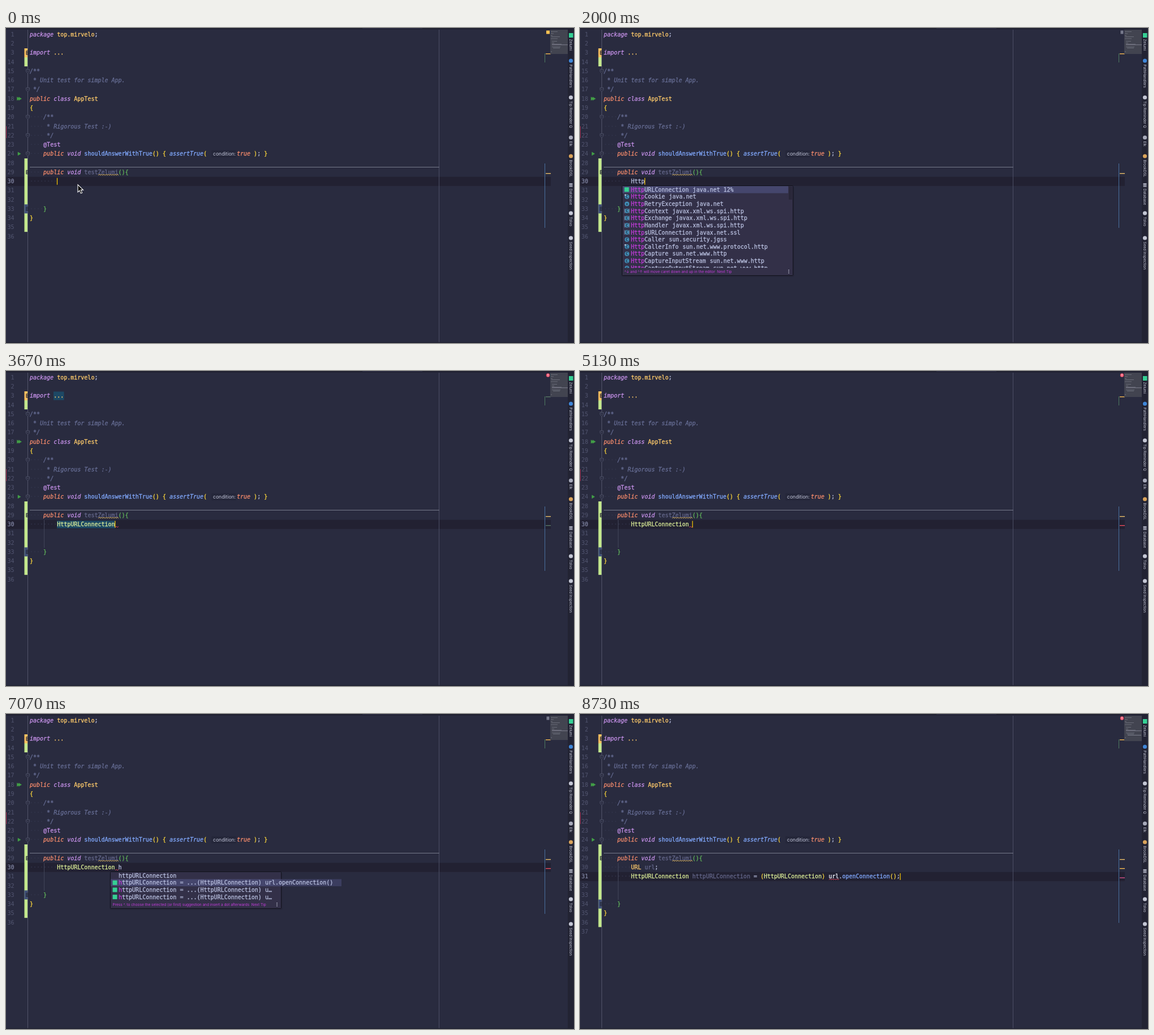
Recreate the animation shown at these times as an HTML page. Size 1004 px wide and 558 px high, loop 8.76 s.

```html
<!DOCTYPE html>
<html lang="en">
<head>
<meta charset="utf-8">
<title>Editor completion</title>
<style>
html, body { margin: 0; width: 100%; height: 100%; overflow: hidden; background: #292b3f; }
svg { display: block; width: 1004px; height: 558px; }
text { white-space: pre; font: 10px "DejaVu Sans Mono", monospace; }
text, tspan { fill: currentColor; stroke: currentColor; stroke-width: .28px; }
text.ui { font-family: Inter, "Noto Sans", sans-serif; stroke-width: 0; }
.p { color: #c792ea; font-style: italic; }
.o { color: #f78c6c; font-style: italic; }
.i { color: #82aaff; font-style: italic; }
.c { color: #676e95; font-style: italic; }
.a { color: #c792ea; }
.y { color: #ffcb6b; }
.b { color: #ffd83b; }
.g { color: #62b85b; }
.l { color: #dcee98; }
.m { color: #82aaff; }
.w { color: #b9c0e0; }
.u { color: #f3f4ff; }
.d { color: #64678a; }
.s { color: #363850; stroke-width: 0; }
.h { color: #c43cdb; }
</style>
</head>
<body>
<svg id="stage" viewBox="0 0 1004 558" xml:space="preserve"></svg>
<script>
const LOOP = 8760, STEP = 16.27, CHAR = 6.02;
const PANEL = '#333048', SELECTED = '#45466d';
const TYPING = [[0, ''], [1000, 'H'], [1300, 'Ht'], [1450, 'Htt'], [1600, 'Http'],
  [2600, 'HttpURLConnection'], [4100, 'HttpURLConnection '], [6130, 'HttpURLConnection h'], [7930, ''], [8430, '']];
const HEAD = [
  '~ppackage ~ytop.mirvelo~w;', '', '~pimport ~y...', '',
  '~c/**', '~c * Unit test for simple App.', '~c */',
  '~opublic ~pclass ~yAppTest', '~b{',
  '    ~c/**', '    ~c * Rigorous Test :-)', '    ~c */', '    ~a@Test',
  '    ~opublic ~pvoid ~mshouldAnswerWithTrue~b() { ~iassertTrue~b(', '',
  '    ~opublic ~pvoid ~dtestZelumi~g(){'];
const FINAL = ['        ~yURL ~durl~w;',
  '        ~lHttpURLConnection ~dhttpURLConnection ~w= ~b(~lHttpURLConnection~b) ~uurl~w.~mopenConnection~b()~w;'];
const CLASSES = ['URLConnection java.net 12%', 'Cookie java.net', 'RetryException java.net',
  'Context javax.xml.ws.spi.http', 'Exchange javax.xml.ws.spi.http', 'Handler javax.xml.ws.spi.http',
  'sURLConnection javax.net.ssl', 'Caller sun.security.jgss', 'CallerInfo sun.net.www.protocol.http',
  'Capture sun.net.www.http', 'CaptureInputStream sun.net.www.http', 'CaptureOutputStream sun.net.www.http'];
const CAST = 'ttpURLConnection = ...(HttpURLConnection) u';
const VARS = ['ttpURLConnection', CAST + 'rl.openConnection()', CAST + '…', CAST + '…'];
const TOOLS = [[13, 'Zelumi', '#35d094'], [58, 'PathHandlers', '#3f86d8'], [123, 'Tip Reminder Q', '#c3c6d4'],
  [194, 'Elk', '#a7aabb'], [227, 'BrookDSL', '#d9a35b'], [278, 'Database', ''],
  [328, 'Tolvo', '#c3c6d4'], [372, 'Seed Inspection', '#c3c6d4']];

const rowY = i => 11.3 + STEP * i;
const itemY = i => 286.2 + i * 12.64;
const rect = (x, y, w, h, fill, more = '') => `<rect x="${x}" y="${y}" width="${w}" height="${h}" fill="${fill}" ${more}/>`;
const path = (d, stroke, width = 1, fill = 'none') => `<path d="${d}" stroke="${stroke}" stroke-width="${width}" fill="${fill}"/>`;
const dot = (x, y, r, fill) => `<circle cx="${x}" cy="${y}" r="${r}" fill="${fill}"/>`;
const text = (x, y, cls, s, more = '') => `<text x="${x}" y="${y + 3.5}" class="${cls}" ${more}>${s}</text>`;
const ui = (x, y, size, color, s) =>
  `<text class="ui" x="${x}" y="${y + size * .36}" style="font-size:${size}px;color:${color}">${s}</text>`;

// Leading spaces become whitespace dots; "~x" starts a span of class x.
function code(x, y, line) {
  const [indent, ...spans] = line.split('~');
  return text(x, y, 's', '·'.repeat(indent.length) +
    spans.map(s => `<tspan class="${s[0]}">${s.slice(1)}</tspan>`).join(''));
}

function wave(x, end, y, color) {
  let d = `M${x} ${y}`;
  for (let k = 0; x < end; k++) d += `L${x += 2} ${y + (k % 2 ? 0 : -1.8)}`;
  return path(d, color, .9);
}

function gutter(n, current) {
  const bar = (y, h, color) => rect(32.5, y, 5.5, h, color);
  let s = bar(36, 16, '#ffc35f') + bar(52, 16, '#c3e88d') +
    bar(231, (n - 15) * STEP, '#c3e88d') + bar(rowY(n - 4) - 8, 16, '#405078') +
    path('M38.5 3V558', '#515469');
  for (let i = 0; i < n; i++)
    s += text(14.5, rowY(i), '', i < 3 ? i + 1 : i + (i < 14 ? 11 : 14),
      `text-anchor="end" style="stroke-width:.1px;color:${i == current ? '#8d92b2' : '#50536d'}"`);
  for (const i of [4, 6, 9, 11, 13]) {
    const y = rowY(i);
    s += path(`M35.5 ${y - 3}h6v4l-3 3l-3 -3zM37 ${y}h3`, '#555970', .8, '#292b3f');
  }
  for (const i of [2, 15, n - 4]) {
    const y = rowY(i);
    s += path(`M36 ${y - 3}h3v6h-3zM36 ${y}h4`, '#252738', 1.2);
  }
  const run = (x, y) => path(`M${x} ${y - 3}l5 3l-5 3z`, '#43a047', .5, '#43a047');
  return s + run(19.5, rowY(7)) + run(22.5, rowY(7)) + run(21, rowY(13));
}

function sidebar() {
  let s = rect(993, 0, 11, 558, '#222333');
  for (const [y, name, color] of TOOLS) {
    if (!color) for (const k of [-3, -.6, 1.8]) s += rect(995.5, y + k, 6, 1.7, '#b7bacb');
    else if (y == 13) s += rect(995, y - 4, 7.5, 8, color);
    else s += dot(998.5, y, 3.6, color);
    s += `<g transform="translate(998.5 ${y + 6.5}) rotate(90)">${ui(0, 0, 6.5, '#c6c9d8', name)}</g>`;
  }
  return s;
}

function status(kind) {
  if (kind == 'square') return rect(955, 4.5, 6, 6, '#ffc252');
  if (kind == 'pause') return rect(956, 4.5, 1.3, 6, '#b9bccd') + rect(958.7, 4.5, 1.3, 6, '#b9bccd');
  if (kind == 'eye') return path('M954.5 7.5q3.5 -4 7 0q-3.5 4 -7 0z', '#c9ccda', .9) + dot(958, 7.5, 1.3, '#c9ccda');
  return dot(958, 7.5, 3.2, '#f0506a') + rect(957.5, 5.3, 1, 2.8, '#fff') + rect(957.5, 8.8, 1, 1, '#fff');
}

function overview(done) {
  let s = rect(962, 3, 31, done ? 45 : 43, '#424450');
  const marks = [[6, 963, 12], [9.5, 963, 5], [13, 963, 3], [15, 964, 15], [18.5, 963, 12], [23, 965, 9],
    [26, 965, 4], [28.3, 965, 17], [33, 965, 15], [35, 967, 12], [41.5, 963, 2]];
  for (const [y, x, w] of marks) s += rect(x, y, w, .8, '#747682');
  return s + rect(965, 29.4, 28, .8, '#8b8e9d') + (done ? rect(968, 37, 24, .8, '#8b8e9d') : '');
}

function typeIcon(x, y, i) {
  let s = dot(x, y, 4, '#428fb8') + `<text x="${x}" y="${y + 2.3}" text-anchor="middle" style="font-size:6.5px;color:#202b3d">${i == 2 ? '+' : 'C'}</text>`;
  if (i > 2 && i < 7) s += path(`M${x - 4} ${y - 4}v8M${x + 4} ${y - 4}v8`, '#7e8daa', 1);
  if (i == 1 || i == 8) s += dot(x - 3, y - 3, 1.3, '#c6cede');
  return s;
}

const panel = (x, height, fill) => rect(x - 2, 281, 306, height + 1, '#1c1d2b', 'opacity=".2" rx="3"') +
  rect(x - .5, 279.5, 302, height, fill, 'stroke="#11121b" rx="1"');

function footer(x, height, tip) {
  const y = 279 + height - 6.5;
  return rect(x, y - 6.5, 301, 13, PANEL) + ui(x + 3.5, y, 6.5, '#c43cdb', tip) +
    [-2.6, 0, 2.6].map(k => dot(x + 294, y + k, .8, '#c4c7d8')).join('');
}

function classPopup(filled, prefix) {
  if (!filled) return panel(75, 159, '#222230');
  let s = panel(75, 159, PANEL) + rect(75, 280, 293, 12.6, SELECTED) + rect(369, 281, 6, 23, '#292739');
  CLASSES.forEach((name, i) => {
    const y = itemY(i), [end, ...place] = name.split(' ');
    s += i ? typeIcon(83, y, i) : rect(78.5, y - 4, 8, 8, '#35d094');
    s += code(90, y, `~h${prefix}~w${'Http'.slice(prefix.length)}${end}`) +
      code(91 + CHAR * (end.length + 5), y, '~w' + place.join(' '));
  });
  return s + footer(75, 159, '^↓ and ^↑ will move caret down and up in the editor&#160; Next Tip');
}

function variablePopup(selected) {
  let s = panel(185, 65, PANEL);
  if (selected) s += rect(486, itemY(selected) - 6.3, 107, 12.6, '#3b3d5f');
  s += rect(185, itemY(selected) - 6.3, 301, 12.6, SELECTED);
  VARS.forEach((name, i) => {
    const y = itemY(i);
    if (i) s += rect(188.5, y - 4, 8, 8, '#35d094');
    s += code(199, y, `~${i ? 'h' : 'w'}h~w${i == 1 && !selected ? VARS[2] : name}`);
  });
  return s + footer(185, 65, 'Press ^. to choose the selected (or first) suggestion and insert a dot afterwards&#160; Next Tip');
}

function scene(t) {
  const [since, typed] = TYPING.filter(e => e[0] <= t).pop();
  const done = t >= 7930, marked = t >= 3100 && t < 4100, error = t >= 3100 && !done;
  const current = done ? 17 : 16, n = done ? 24 : 23, y = rowY(current);
  const [word, rest] = typed.split(' ');
  const live = '        ~' + (t >= 2600 ? 'l' : 'w') + word + (rest == null ? '' : ' ~w' + rest);
  const lines = [...HEAD, ...(done ? FINAL : [live]), '', '', '    ~g}', '~b}'];

  let s = rect(0, 0, 1004, 558, '#292b3f') + rect(0, y - 8, 963, 16.2, '#222132');
  s += path('M765.5 3V558', '#4b4e64') + path('M42 246.5H766', '#777a8c');
  s += gutter(n, current);
  if (t < 1000 || t >= 1270) s += rect(0, 174, 1, 21, '#a52c4e');
  if (t >= 2600) s += path(`M67.5 264V${done ? 329 : 313}`, '#414459');
  if (marked) s += rect(84, 36.5, 18.5, 15, '#1d4864') + rect(90, y - 6.5, 103, 13.5, '#1d4864');
  lines.forEach((line, i) => s += code(42, rowY(i), line));
  s += rect(363, 216.5, 44, 13, '#25273a', 'rx="2"') + ui(366, 222.7, 8.6, '#c0c4d8', 'condition:') +
    code(408, rowY(13), '~otrue ~b)~w; ~b}');
  s += wave(163, 199, 261, '#e0b44e');
  if (error) s += wave(193, 198, 277, '#e0475c');
  if (t >= 8430) s += wave(440, 458, y + 6, '#e0475c');

  const caret = 90.5 + CHAR * (done ? 79 : typed.length);
  if ((t - since) % 1000 < 500) s += path(`M${caret} ${y - 6}v12`, '#ffcc00', 1.2);

  s += path(`M952.5 240V${done ? 370 : 354}`, '#49709f') + path('M952.5 45V61', '#4e7960');
  const stripes = [[45, marked ? '#587665' : '#f5b851'], [257, '#e8bd68']];
  if (error) stripes.push([273, marked ? '#587665' : '#e94c5c']);
  if (done) stripes.push([273, '#f5b851'], [289.5, '#d4538a']);
  for (const [sy, color] of stripes) s += rect(954, sy, 9, 1.4, color);

  const list = t >= 1270 && t < 2600, vars = t >= 6170 && !done;
  const kind = t < 1000 ? 'square' : list || vars ? 'pause' :
    t < 3300 || t >= 4100 && t < 4600 || done && t < 8430 ? 'eye' : 'error';
  s += overview(done) + status(kind) + sidebar();
  s += rect(0, 0, 1004, 2.5, '#202131') + rect(630, 0, 106, 1, '#2f3148') + rect(0, 556.5, 1004, 1.5, '#212231');

  if (t >= 1060 && t < 2600) s += classPopup(list, typed);
  if (vars) s += variablePopup(t < 6930 ? 0 : 1);
  if (t < 1000) s += path('M127 277.5v13.2l3 -2.8l2.2 5l2.4 -1l-2.2 -5h4.1z', '#fff', 1.1, '#000');
  return s;
}

const stage = document.getElementById('stage');
const start = performance.now();
let shown = '';
function draw() {
  const next = scene((performance.now() - start) % LOOP);
  if (next != shown) stage.innerHTML = shown = next;
  requestAnimationFrame(draw);
}
draw();
</script>
</body>
</html>
```
